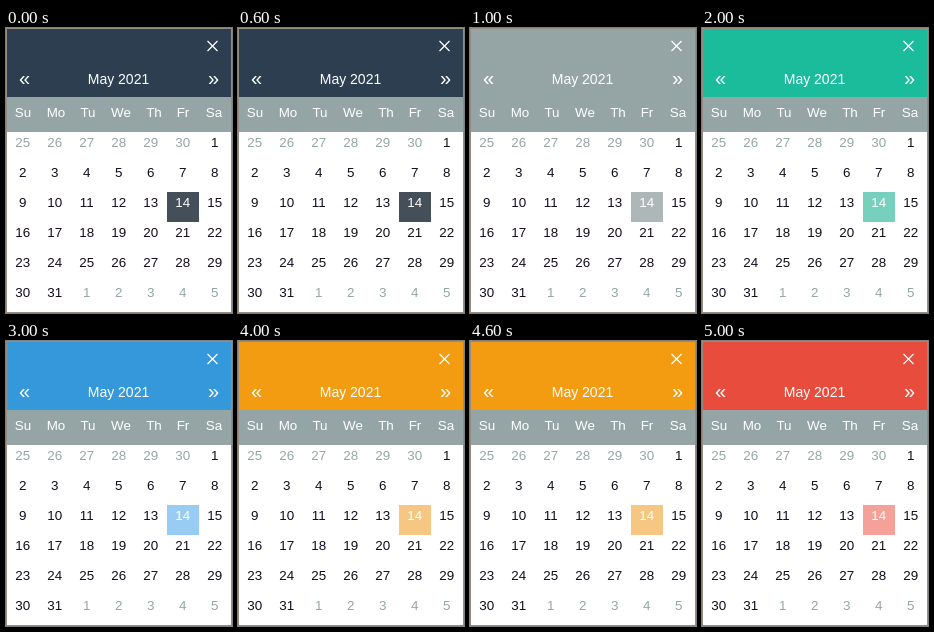
An HTML page for the animation above (6000 ms loop, 226 by 285 pixels).

```html
<!DOCTYPE html>
<html lang="en">
<head>
<meta charset="utf-8">
<title>Calendar themes</title>
<style>
  html, body { margin: 0; width: 100%; height: 100%; overflow: hidden; background: #fff; }
  svg { display: block; }
  text { font: 13.4px "Liberation Sans", Arial, sans-serif; text-anchor: middle; fill: #140c1c; }
  .light { fill: #fff; }
  .muted { fill: #95a5a6; }
  .title { font-size: 14px; }
  .arrow { font-size: 20px; }
</style>
</head>
<body>
<svg id="calendar" width="226" height="285" viewBox="0 0 226 285">
  <rect id="header" width="226" height="69"/>
  <rect y="69" width="226" height="35" fill="#95a5a6"/>
  <rect id="selected" x="161" y="164" width="32" height="30"/>
  <path d="M201.5 13l10 10m0-10l-10 10" stroke="#fff" stroke-width="1.2"/>
  <rect x=".5" y=".5" width="225" height="284" fill="none" stroke="#968c80"/>
</svg>
<script>
const calendar = document.getElementById("calendar");
const header = document.getElementById("header");
const selected = document.getElementById("selected");

const themes = [
  { header: "#2c3e50", selected: "#444f5a" },
  { header: "#95a5a6", selected: "#aeb7b8" },
  { header: "#1abc9c", selected: "#76d0bd" },
  { header: "#3498db", selected: "#98ccf2" },
  { header: "#f39c12", selected: "#f5c783" },
  { header: "#e74c3c", selected: "#f4a199" }
];
const themeDuration = 1000;

function addText(content, x, y, className = "") {
  const text = document.createElementNS("http://www.w3.org/2000/svg", "text");
  text.setAttribute("x", x);
  text.setAttribute("y", y);
  text.setAttribute("class", className);
  text.textContent = content;
  calendar.append(text);
}

addText("«", 18.5, 57, "light arrow");
addText("May 2021", 112.5, 56, "light title");
addText("»", 207.5, 57, "light arrow");

const weekdayCenters = [17, 50, 82, 115, 148, 177, 208];
["Su", "Mo", "Tu", "We", "Th", "Fr", "Sa"].forEach((name, i) =>
  addText(name, weekdayCenters[i], 89, "light"));

for (let cell = 0; cell < 42; cell++) {
  const date = new Date(2021, 3, 25 + cell);
  const inMonth = date.getMonth() === 4;
  const day = date.getDate();
  const style = !inMonth ? "muted" : day === 14 ? "light" : "";
  addText(day, 16.8 + 32 * (cell % 7), 119 + 30 * Math.floor(cell / 7), style);
}

function draw() {
  const theme = themes[Math.floor(performance.now() / themeDuration) % themes.length];
  header.setAttribute("fill", theme.header);
  selected.setAttribute("fill", theme.selected);
  requestAnimationFrame(draw);
}
draw();
</script>
</body>
</html>
```
